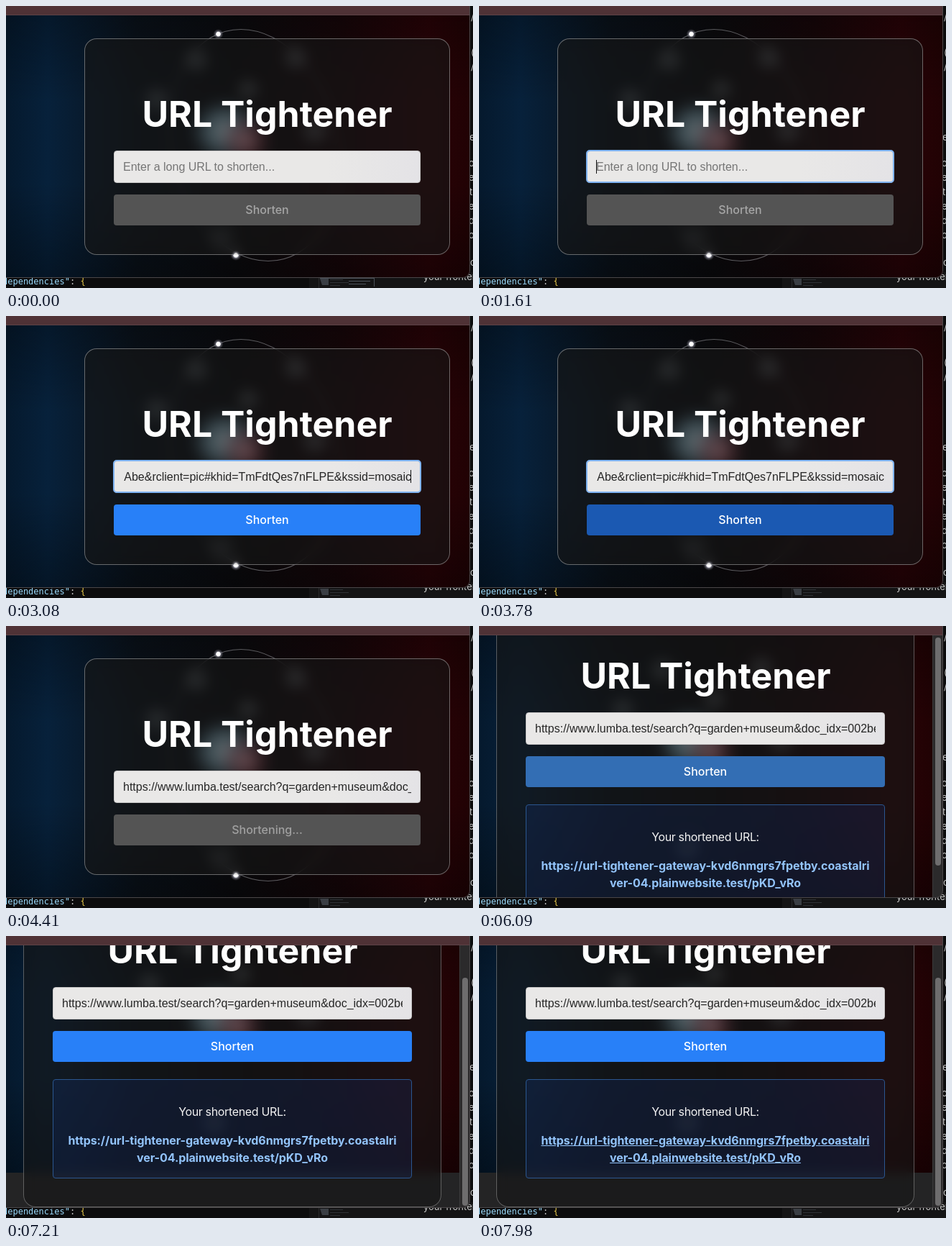
Write an HTML page that moves like this. It is 650 px wide and 392 px high and loops after 8 s.

```html
<!DOCTYPE html>
<html lang="en">
<head>
<meta charset="utf-8">
<title>URL Tightener</title>
<style>
  * { box-sizing: border-box; }
  html, body { margin: 0; width: 100%; height: 100%; overflow: hidden; background: #0b0b0c; }
  body, .stage { position: relative; }
  .stage { width: 650px; height: 392px; overflow: hidden; font-family: Inter, sans-serif; }
  .stage *, .stage { animation-duration: 8s; animation-iteration-count: infinite; animation-timing-function: step-end; }
  .stage div, .stage svg { position: absolute; }

  /* editor behind the window */
  .desk { left: 0; top: 0; }
  .code { font: 12px "DejaVu Sans Mono", monospace; }
  .note { font: 13px Inter, sans-serif; fill: #c8c8c8; }
  .thumb { animation-name: thumb; }
  @keyframes thumb { 0% { opacity: 1; } 1.75%, 100% { opacity: 0; } }

  /* browser window */
  .win { left: -12px; top: 0; width: 658px; height: 378px; overflow: hidden; border-radius: 0 0 10px 10px; background: #242425; }
  .edge { inset: 0; border: solid #4a4648; border-width: 0 1px 1px 0; border-radius: 0 0 10px 10px; }
  .bar { left: 0; top: 0; width: 658px; height: 13px; background: #4f3236; border-bottom: 1px solid #5c4246; }
  .view { left: 12px; top: 0; width: 634px; height: 378px; }
  .first { width: 646px; animation-name: first; }
  .second { width: 631px; overflow: hidden; animation-name: second; }
  @keyframes first { 0% { visibility: visible; } 76.125%, 100% { visibility: hidden; } }
  @keyframes second { 0% { visibility: hidden; } 76.125%, 100% { visibility: visible; } }
  .page { left: 0; top: 0; width: 631px; height: 440px; animation-name: scroll; }
  @keyframes scroll {
    0% { transform: none; }
    87.5% { transform: translateY(-16px); }
    88.375% { transform: translateY(-33px); }
    89.25% { transform: translateY(-44px); }
    90.125%, 100% { transform: translateY(-49px); }
  }
  .track { left: 643px; top: 13px; width: 15px; height: 365px; background: #2b2a2b; border-left: 1px solid #3b3a3b; animation-name: second; }
  .grip { left: 3px; top: 3px; width: 8px; height: 317px; border-radius: 4px; background: #6e6d6e; animation-name: grip; }
  @keyframes grip {
    0% { transform: none; }
    87.5% { transform: translateY(14px); }
    88.375% { transform: translateY(28px); }
    89.25% { transform: translateY(38px); }
    90.125%, 100% { transform: translateY(42px); }
  }

  .card { border: 1px solid rgba(255,255,255,.36); border-radius: 17px; background: rgba(24,24,24,.62); backdrop-filter: blur(8px); }
  .first .card { left: 109px; top: 45px; width: 509px; height: 301px; }
  .second .card { left: 24px; top: -36px; width: 582px; height: 462px; border-color: rgba(255,255,255,.3); }
  .title { height: 60px; line-height: 60px; text-align: center; color: #fff; font-size: 50px; font-weight: 700; white-space: nowrap; }
  .first .title { left: 109px; top: 120px; width: 509px; }
  .second .title { left: 0; top: 39px; width: 631px; }

  .field { height: 45px; border: 1px solid #c9c8c8; border-radius: 4px; background: linear-gradient(90deg, #e9e8e7 70%, #e4e3e6); overflow: hidden; }
  .first .field { left: 150px; top: 201px; width: 427px; }
  .second .field { left: 65px; top: 120px; width: 500px; }
  .ring { left: 149px; top: 200px; width: 429px; height: 46px; border: 2px solid #80b4f2; border-radius: 5px; animation-name: ring; }
  @keyframes ring { 0% { opacity: 0; } 20.125% { opacity: 1; } 51.625%, 100% { opacity: 0; } }
  .text { left: 12px; right: 12px; top: 0; height: 43px; display: flex; overflow: hidden; font: 16px/43px "Liberation Sans", Arial, sans-serif; color: #262626; white-space: nowrap; }
  .hint { color: #757575; animation-name: hint; }
  .tail { justify-content: flex-end; animation-name: tail; }
  .head { animation-name: head; }
  @keyframes hint { 0% { opacity: 1; } 35.875%, 100% { opacity: 0; } }
  @keyframes tail { 0% { opacity: 0; } 35.875% { opacity: 1; } 51.625%, 100% { opacity: 0; } }
  @keyframes head { 0% { opacity: 0; } 51.625%, 100% { opacity: 1; } }
  .caret { top: 214px; width: 1px; height: 19px; background: #111; }
  .c1 { left: 163px; animation-name: caret1; }
  .c2 { left: 563px; height: 18px; animation-name: caret2; }
  @keyframes caret1 { 0% { opacity: 0; } 20.125% { opacity: 1; } 26.25% { opacity: 0; } 33.25% { opacity: 1; } 35.875%, 100% { opacity: 0; } }
  @keyframes caret2 { 0% { opacity: 0; } 35.875% { opacity: 1; } 42.875% { opacity: 0; } 49.875% { opacity: 1; } 51.625%, 100% { opacity: 0; } }

  .btn { height: 43px; line-height: 43px; border-radius: 4px; text-align: center; font-size: 16px; font-weight: 500; color: #fff; }
  .btn div { inset: 0; }
  .first .btn { left: 150px; top: 262px; width: 427px; animation-name: press; animation-timing-function: linear; }
  .second .btn { left: 65px; top: 181px; width: 500px; animation-name: wake; animation-timing-function: linear; }
  @keyframes press {
    0%, 35.2% { background: #545454; color: #a6a6a6; }
    38.5%, 45.2% { background: #2880f8; color: #fff; }
    47.25%, 51.2% { background: #1b59b2; color: #fff; }
    55.125%, 100% { background: #545454; color: #a0a0a0; }
  }
  @keyframes wake { 0%, 76.125% { background: #336eb4; } 77.875%, 100% { background: #2880f8; } }
  .idle { animation-name: idle; }
  @keyframes idle { 0% { opacity: 1; } 51.625%, 100% { opacity: 0; } }

  .result { left: 65px; top: 248px; width: 500px; height: 138px; border: 1px solid #2b568f; border-radius: 4px; background: rgba(20,80,230,.11); text-align: center; font-size: 16px; color: #f2f2f2; }
  .result div { left: 0; width: 100%; line-height: 24px; white-space: nowrap; }
  .label { top: 32px; letter-spacing: -.35px; }
  .link { top: 72px; font-weight: 700; letter-spacing: -.08px; color: #93c4fb; text-decoration: underline transparent; animation-name: link; }
  @keyframes link { 0% { text-decoration-color: transparent; } 97.125%, 100% { text-decoration-color: #93c4fb; } }
</style>
</head>
<body>
<div class="stage">
  <svg class="desk" width="650" height="392">
    <defs>
      <linearGradient id="sky">
        <stop offset="0" stop-color="#05192d"/><stop offset=".09" stop-color="#07213b"/>
        <stop offset=".28" stop-color="#0a121b"/><stop offset=".5" stop-color="#0b0b0e"/>
        <stop offset=".72" stop-color="#170609"/><stop offset=".91" stop-color="#2a0307"/>
        <stop offset="1" stop-color="#210204"/>
      </linearGradient>
      <linearGradient id="shade" x2="0" y2="1">
        <stop offset="0" stop-opacity=".3"/><stop offset=".35" stop-opacity="0"/>
        <stop offset=".65" stop-opacity="0"/><stop offset="1" stop-opacity=".35"/>
      </linearGradient>
      <radialGradient id="blue">
        <stop offset="0" stop-color="#dcf5ff"/><stop offset=".45" stop-color="#a4d6ea" stop-opacity=".75"/>
        <stop offset="1" stop-color="#507c90" stop-opacity="0"/>
      </radialGradient>
      <radialGradient id="pink">
        <stop offset="0" stop-color="#f4a4b0" stop-opacity=".9"/><stop offset=".5" stop-color="#c8606f" stop-opacity=".5"/>
        <stop offset="1" stop-color="#a03c50" stop-opacity="0"/>
      </radialGradient>
      <radialGradient id="mist">
        <stop offset="0" stop-color="#a8b4b8" stop-opacity=".4"/><stop offset=".6" stop-color="#909a9e" stop-opacity=".22"/>
        <stop offset="1" stop-color="#808080" stop-opacity="0"/>
      </radialGradient>
      <radialGradient id="spark">
        <stop offset="0" stop-color="#fff"/><stop offset=".4" stop-color="#fff"/>
        <stop offset=".55" stop-color="#ccd" stop-opacity=".4"/><stop offset="1" stop-color="#aab" stop-opacity="0"/>
      </radialGradient>
      <g id="glow">
        <circle cx="265" cy="75" r="22" fill="url(#mist)"/>
        <circle cx="403" cy="72" r="22" fill="url(#mist)"/>
        <circle cx="430" cy="173" r="24" fill="url(#mist)"/>
        <circle cx="337" cy="116" r="20" fill="url(#mist)"/>
        <circle cx="210" cy="130" r="22" fill="url(#mist)"/>
        <circle cx="300" cy="322" r="26" fill="url(#mist)" opacity=".6"/>
        <ellipse cx="305" cy="174" rx="52" ry="48" fill="url(#blue)"/>
        <circle cx="334" cy="188" r="38" fill="url(#pink)"/>
      </g>
      <g id="orbit">
        <ellipse rx="117" ry="161" transform="translate(346 193.5) skewX(6.7)" fill="none" stroke="#8f8f94" stroke-opacity=".6"/>
        <circle cx="295.5" cy="39" r="7" fill="url(#spark)"/>
        <circle cx="320" cy="346" r="8" fill="url(#spark)"/>
      </g>
    </defs>
    <rect width="650" height="392" fill="#0c0c0d"/>
    <rect x="422" y="370" width="228" height="22" fill="#141415"/>
    <rect x="435" y="370" width="1" height="22" fill="#2a2a2c"/>
    <g fill="#4a5058">
      <path d="M437 379h12v9h-9z" opacity=".7"/>
      <path d="M451 380h18v1h-18zm0 4h26v1h-26zm0 4h14v1h-14z" opacity=".5"/>
      <path class="thumb" d="M437 378h75v1h-75zm40 4h30v1h-30zm0 4h24v1h-24zm35-8h1v12h-1z"/>
    </g>
    <text class="code" x="-5" y="387" fill="#9cdcfe">dependencies"<tspan fill="#ccc">:</tspan> <tspan fill="#e6c84c">{</tspan></text>
    <text class="note" x="581" y="381">your frontend</text>
    <g class="note">
      <text x="647" y="20">/</text><text x="647" y="69">(</text><text x="647" y="89">/</text>
      <text x="645" y="187">e</text><text x="644" y="223">o</text><text x="644" y="243">e</text>
      <text x="645" y="263">t</text><text x="644" y="283">e</text><text x="644" y="303">d</text>
      <text x="644" y="323">o</text><text x="646" y="361">c</text>
    </g>
  </svg>

  <div class="win">
    <div class="view first">
      <svg width="646" height="378">
        <rect width="646" height="378" fill="url(#sky)"/>
        <rect width="646" height="378" fill="url(#shade)"/>
        <use href="#glow"/>
        <use href="#orbit"/>
      </svg>
      <div class="card"></div>
      <svg width="646" height="378"><circle cx="320" cy="346" r="6" fill="url(#spark)" opacity=".8"/></svg>
      <div class="title">URL Tightener</div>
      <div class="field">
        <div class="text hint">Enter a long URL to shorten...</div>
        <div class="text tail">Abe&amp;rclient=pic#khid=TmFdtQes7nFLPE&amp;kssid=mosaic</div>
        <div class="text head">https://www.lumba.test/search?q=garden+museum&amp;doc_idx=002be</div>
      </div>
      <div class="ring"></div>
      <div class="caret c1"></div>
      <div class="caret c2"></div>
      <div class="btn">
        <div class="idle">Shorten</div>
        <div class="head">Shortening...</div>
      </div>
    </div>

    <div class="view second">
      <div class="page">
        <svg width="631" height="378">
          <rect width="631" height="378" fill="url(#sky)"/>
          <rect width="631" height="378" fill="url(#shade)"/>
          <use href="#glow" x="-10" y="-14"/>
        </svg>
        <div class="card"></div>
        <div class="title">URL Tightener</div>
        <div class="field"><div class="text">https://www.lumba.test/search?q=garden+museum&amp;doc_idx=002be71</div></div>
        <div class="btn">Shorten</div>
        <div class="result">
          <div class="label">Your shortened URL:</div>
          <div class="link">https://url-tightener-gateway-kvd6nmgrs7fpetby.coastalri<br>ver-04.plainwebsite.test/pKD_vRo</div>
        </div>
      </div>
    </div>
    <div class="track"><div class="grip"></div></div>
    <div class="bar"></div>
    <div class="edge"></div>
  </div>
</div>
</body>
</html>
```
